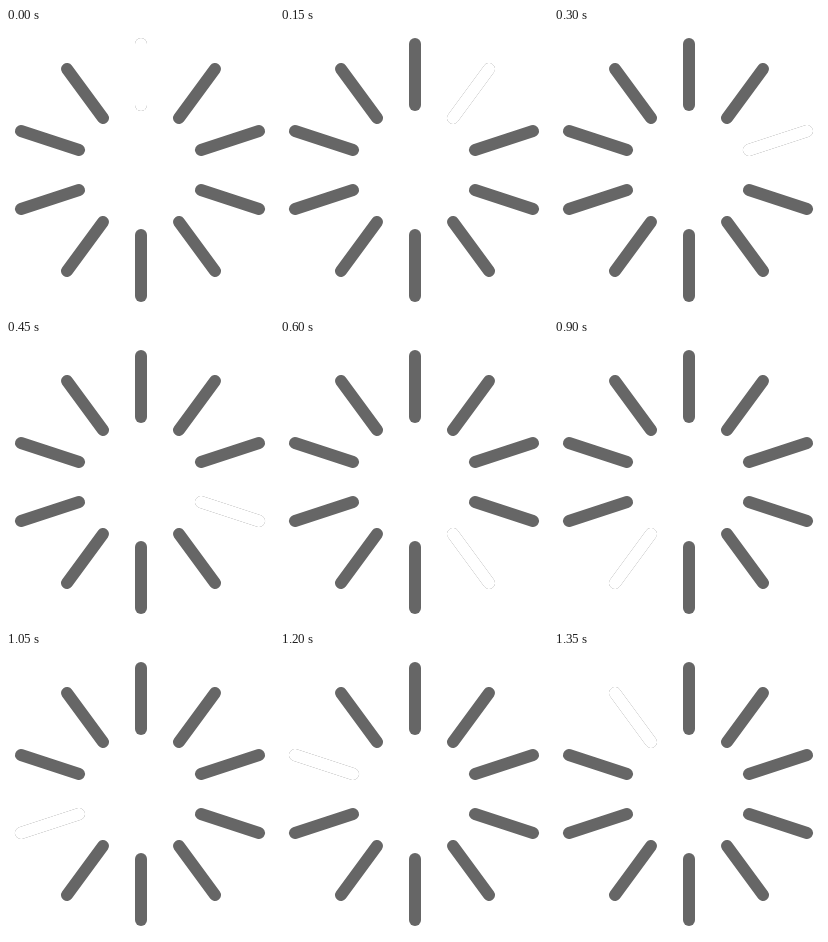
Recreate the animation shown at these times as an HTML page without scripts. Size 268 by 284 pixels, loop 1.5 s.

```html
<!DOCTYPE html>
<html lang="en">
<head>
<meta charset="utf-8">
<title>Spinner</title>
<style>
  html, body { margin: 0; width: 100%; height: 100%; overflow: hidden; background: #fff; }
  svg { display: block; }
  .spokes, .blanks { stroke-width: 12; stroke-linecap: round; }
  .spokes { stroke: #666; }
  .blanks { stroke: #fff; }
  /* A white spoke covers each grey one in turn */
  .blanks use {
    opacity: 0;
    animation: blank 1500ms step-end calc(var(--i) * 150ms - 1500ms) infinite;
  }
  @keyframes blank {
    0% { opacity: 1; }
    10%, 100% { opacity: 0; }
  }
</style>
</head>
<body>
<svg width="268" height="284" viewBox="0 0 268 284">
  <defs>
    <path id="s0" d="M135 16V77"/>
    <path id="s1" d="M209 41L173 90"/>
    <path id="s2" d="M253 103L195 122"/>
    <path id="s3" d="M253 181L195 162"/>
    <path id="s4" d="M209 243L173 194"/>
    <path id="s5" d="M135 268V207"/>
    <path id="s6" d="M61 243L97 194"/>
    <path id="s7" d="M15 181L73 162"/>
    <path id="s8" d="M15 103L73 122"/>
    <path id="s9" d="M61 41L97 90"/>
  </defs>
  <g class="spokes">
    <use href="#s0"/>
    <use href="#s1"/>
    <use href="#s2"/>
    <use href="#s3"/>
    <use href="#s4"/>
    <use href="#s5"/>
    <use href="#s6"/>
    <use href="#s7"/>
    <use href="#s8"/>
    <use href="#s9"/>
  </g>
  <g class="blanks">
    <use href="#s0" style="--i:0"/>
    <use href="#s1" style="--i:1"/>
    <use href="#s2" style="--i:2"/>
    <use href="#s3" style="--i:3"/>
    <use href="#s4" style="--i:4"/>
    <use href="#s5" style="--i:5"/>
    <use href="#s6" style="--i:6"/>
    <use href="#s7" style="--i:7"/>
    <use href="#s8" style="--i:8"/>
    <use href="#s9" style="--i:9"/>
  </g>
</svg>
</body>
</html>
```
